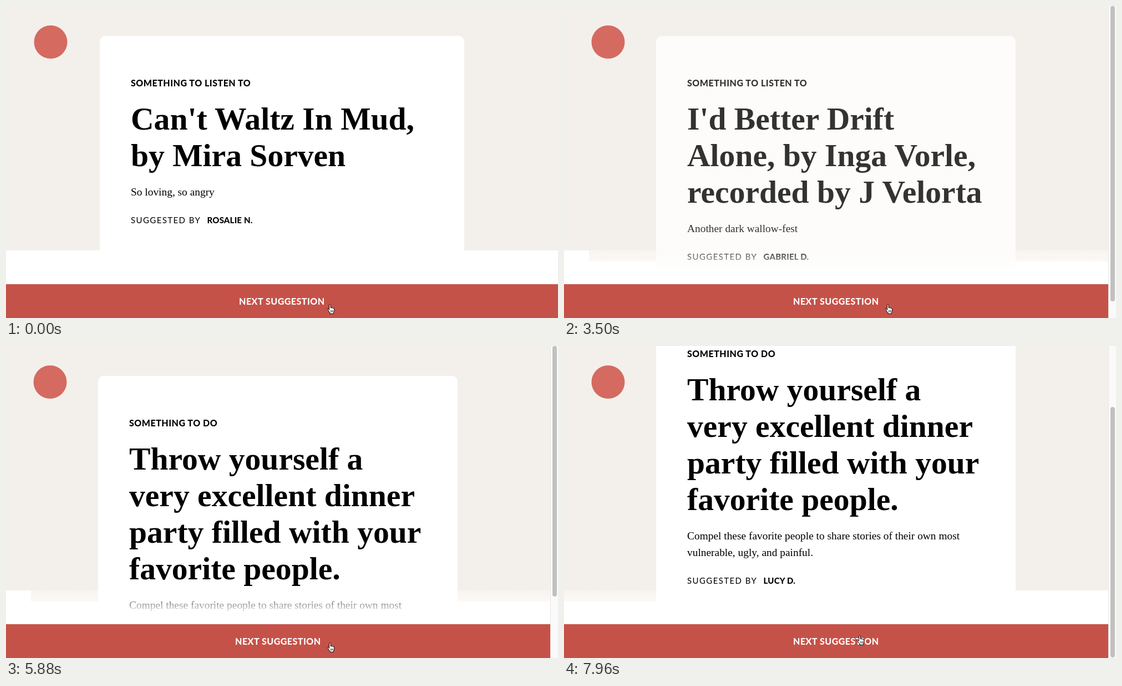
An HTML page for the animation above (8 s loop, 995 by 563 pixels).

```html
<!DOCTYPE html>
<html lang="en">
<head>
<meta charset="utf-8">
<title>Suggestions</title>
<style>
  html, body { margin: 0; width: 100%; height: 100%; overflow: hidden; background: #fff; }
  svg { display: block; width: 995px; height: 563px; }
  svg * { animation: 0s step-end infinite; animation-duration: 8s; }

  .kind, .label, .name { font: 800 16px Lato, sans-serif; letter-spacing: .5px; }
  .head { font: 700 57.6px "Liberation Serif", serif; }
  .note { font: 400 19.4px "Liberation Serif", serif; }
  .by { font: 400 15px Lato, sans-serif; letter-spacing: 1.4px; }
  .name { font-size: 15px; letter-spacing: .2px; }
  .label { fill: #fff; }

  /* page layout: full width first, then with a scrollbar */
  #wide { fill: #fff; animation-name: wide; }
  #narrow { fill: #fff; animation-name: narrow; }
  #bar-side { animation-name: appear; }
  #logo { fill: #d56a61; animation-name: nudge; }
  .label { animation-name: shift; }
  @keyframes wide {
    0% { fill: #fff; opacity: 1; }
    13% { fill: #fdfcfa; opacity: 1; }
    17.125%, 100% { opacity: 0; }
  }
  @keyframes narrow {
    0% { opacity: 0; }
    17.125% { fill: #fdfcfa; opacity: 1; }
    21.25% { fill: #fff; opacity: 1; }
    43.75% { fill: #fdfcfa; opacity: 1; }
    56.625%, 100% { fill: #fff; opacity: 1; }
  }
  @keyframes appear { 0% { opacity: 0; } 17.125%, 100% { opacity: 1; } }
  @keyframes nudge { 0% { transform: none; } 17.125%, 100% { transform: translateX(-1px); } }
  @keyframes shift { 0% { transform: none; } 17.125%, 100% { transform: translateX(-7px); } }

  /* slides fade one after another */
  #slide1 { animation-name: slide1; }
  #slide2 { animation-name: slide2; }
  #slide3 { animation-name: slide3; }
  @keyframes slide1 { 0% { opacity: 1; } 13%, 100% { opacity: 0; } }
  @keyframes slide2 {
    0% { opacity: 0; }
    17.125% { opacity: .25; }
    19% { opacity: .7; }
    21.25% { opacity: 1; }
    43.75% { opacity: .8; }
    45.5% { opacity: .4; }
    47.375%, 100% { opacity: 0; }
  }
  @keyframes slide3 {
    0% { opacity: 0; }
    51.125% { opacity: .15; }
    53% { opacity: .5; }
    54.75% { opacity: .85; }
    56.625%, 100% { opacity: 1; }
  }

  /* scrolling */
  #page { animation-name: scroll; }
  #thumb { fill: #c1c1c1; animation-name: thumb; }
  @keyframes scroll {
    0% { transform: none; }
    81% { transform: translateY(-35.5px); }
    82.875% { transform: translateY(-68px); }
    84.75% { transform: translateY(-89px); }
    86.625% { transform: translateY(-106px); }
    88.5%, 100% { transform: translateY(-125px); }
  }
  @keyframes thumb {
    0% { height: 533px; transform: none; }
    51.125% { height: 452px; transform: none; }
    81% { height: 452px; transform: translateY(31px); }
    82.875% { height: 452px; transform: translateY(60px); }
    84.75% { height: 452px; transform: translateY(78px); }
    86.625% { height: 452px; transform: translateY(93px); }
    88.5%, 100% { height: 452px; transform: translateY(110px); }
  }

  /* tinted strip beside the card */
  #strip-far { animation-name: far; }
  #strip-mid { animation-name: appear; }
  #strip-right { animation-name: right; }
  @keyframes far { 0% { opacity: 0; } 75.375%, 100% { opacity: 1; } }
  @keyframes right { 0% { opacity: 0; } 17.125% { opacity: 1; } 81%, 100% { opacity: 0; } }

  #button { fill: #c55248; animation-name: hover; }
  @keyframes hover {
    0% { fill: #c55248; }
    75.375% { fill: #d56a61; }
    97.625%, 100% { fill: #c55248; }
  }

  /* pointer shapes */
  #hand { animation-name: hand; }
  #beam { animation-name: beam; }
  #arrow { animation-name: arrow; }
  @keyframes hand {
    0% { opacity: 1; transform: translate(578px, 538px); }
    73.5% { opacity: 1; transform: translate(578px, 535px); }
    75.375% { opacity: 0; }
    97.625% { opacity: 1; transform: translate(529px, 516px); }
    99.5%, 100% { opacity: 1; transform: translate(527px, 522px); }
  }
  @keyframes beam {
    0% { opacity: 0; }
    75.375% { opacity: 1; transform: translate(569px, 421px); }
    77.25% { opacity: 1; transform: translate(569px, 399px); }
    90.25%, 100% { opacity: 0; }
  }
  @keyframes arrow {
    0% { opacity: 0; }
    90.25% { opacity: 1; transform: translate(567px, 398px); }
    94% { opacity: 1; transform: translate(567px, 399px); }
    95.75% { opacity: 1; transform: translate(541px, 472px); }
    97.625%, 100% { opacity: 0; }
  }
</style>
</head>
<body>
<svg viewBox="0 0 995 563">
  <defs>
    <linearGradient id="veil" x2="0" y2="1">
      <stop offset="0" stop-color="#fff" stop-opacity="0"/>
      <stop offset="1" stop-color="#fff"/>
    </linearGradient>
    <linearGradient id="tint" x2="0" y2="1">
      <stop offset="0" stop-color="#f8f4f0"/>
      <stop offset="1" stop-color="#fbf8f6"/>
    </linearGradient>
  </defs>

  <rect width="995" height="441" fill="#f3f0ec"/>
  <rect y="441" width="995" height="122" fill="#fff"/>
  <circle id="logo" cx="80.5" cy="65" r="30"/>

  <path id="wide" d="M169 441V64a10 10 0 0 1 10-10H816a10 10 0 0 1 10 10V441Z"/>
  <g id="slide1">
    <text class="kind" x="225" y="144.5">SOMETHING TO LISTEN TO</text>
    <g class="head">
      <text x="225" y="222.5">Can't Waltz In Mud,</text>
      <text x="225" y="288.5">by Mira Sorven</text>
    </g>
    <text class="note" x="225" y="342">So loving, so angry</text>
    <text class="by" x="225" y="392">SUGGESTED BY</text>
    <text class="name" x="362.5" y="392">ROSALIE N.</text>
  </g>

  <g id="page">
    <rect id="narrow" x="166" y="54" width="648" height="640" rx="10"/>
    <g id="slide2">
      <text class="kind" x="222" y="144.5">SOMETHING TO LISTEN TO</text>
      <g class="head">
        <text x="222" y="222.5">I'd Better Drift</text>
        <text x="222" y="288.5">Alone, by Inga Vorle,</text>
        <text x="222" y="354.5">recorded by J Velorta</text>
      </g>
      <text class="note" x="222" y="408">Another dark wallow-fest</text>
      <text class="by" x="222" y="458">SUGGESTED BY</text>
      <text class="name" x="359.5" y="458">GABRIEL D.</text>
    </g>
    <g id="slide3">
      <text class="kind" x="222" y="144.5">SOMETHING TO DO</text>
      <g class="head">
        <text x="222" y="222.5">Throw yourself a</text>
        <text x="222" y="288.5">very excellent dinner</text>
        <text x="222" y="354.5">party filled with your</text>
        <text x="222" y="420.5">favorite people.</text>
      </g>
      <g class="note">
        <text x="222" y="474">Compel these favorite people to share stories of their own most</text>
        <text x="222" y="503.5">vulnerable, ugly, and painful.</text>
      </g>
      <text class="by" x="222" y="553.5">SUGGESTED BY</text>
      <text class="name" x="359.5" y="553.5">LUCY D.</text>
    </g>
  </g>

  <rect x="166" y="441" width="648" height="43" fill="url(#veil)"/>
  <rect x="166" y="484" width="648" height="18" fill="#fff"/>
  <g fill="url(#tint)">
    <rect id="strip-far" y="441" width="45" height="20"/>
    <rect id="strip-mid" x="45" y="441" width="121" height="20"/>
    <rect id="strip-right" x="814" y="441" width="167" height="20"/>
  </g>

  <rect id="button" y="502" width="995" height="61"/>
  <text class="label" x="420" y="538.5">NEXT SUGGESTION</text>

  <g id="bar-side">
    <rect x="981" width="14" height="563" fill="#fafafa"/>
    <rect x="981" width="1" height="563" fill="#e8e8e8"/>
    <rect id="thumb" x="985" width="8" height="533" rx="4"/>
  </g>

  <g id="hand" stroke="#000" stroke-linejoin="round">
    <path fill="#fff" d="M4.5 10.5V2.2Q4.5.8 5.8.8T7.1 2.2V6.6Q8.4 5.6 9.4 6.9 10.8 6 11.6 7.5 13.6 7 13.8 9V12Q13.6 14 12.4 15.4V17.2H6V15.6Q4.4 14 3.2 11.8L1.2 9.4Q.6 8 2 7.8 3.2 8 4.5 10.5Z"/>
    <path fill="none" stroke-width=".8" d="M7.5 11v3.5M9.5 11v3.5M11.5 11v3.5"/>
  </g>
  <g id="beam" fill="none">
    <path id="stem" stroke="#fff" stroke-width="2.4" d="M-3-7.3Q-.5-7.3 0-6 .5-7.3 3-7.3M0-6V6M-3 7.3Q-.5 7.3 0 6 .5 7.3 3 7.3M-2 2.5H2"/>
    <path stroke="#222" d="M-3-7.3Q-.5-7.3 0-6 .5-7.3 3-7.3M0-6V6M-3 7.3Q-.5 7.3 0 6 .5 7.3 3 7.3M-2 2.5H2"/>
  </g>
  <path id="arrow" stroke="#fff" d="M.5.8V14.5L3.7 11.6 5.9 16.8 8.2 15.8 6 10.8H10.6Z"/>
</svg>
</body>
</html>
```
